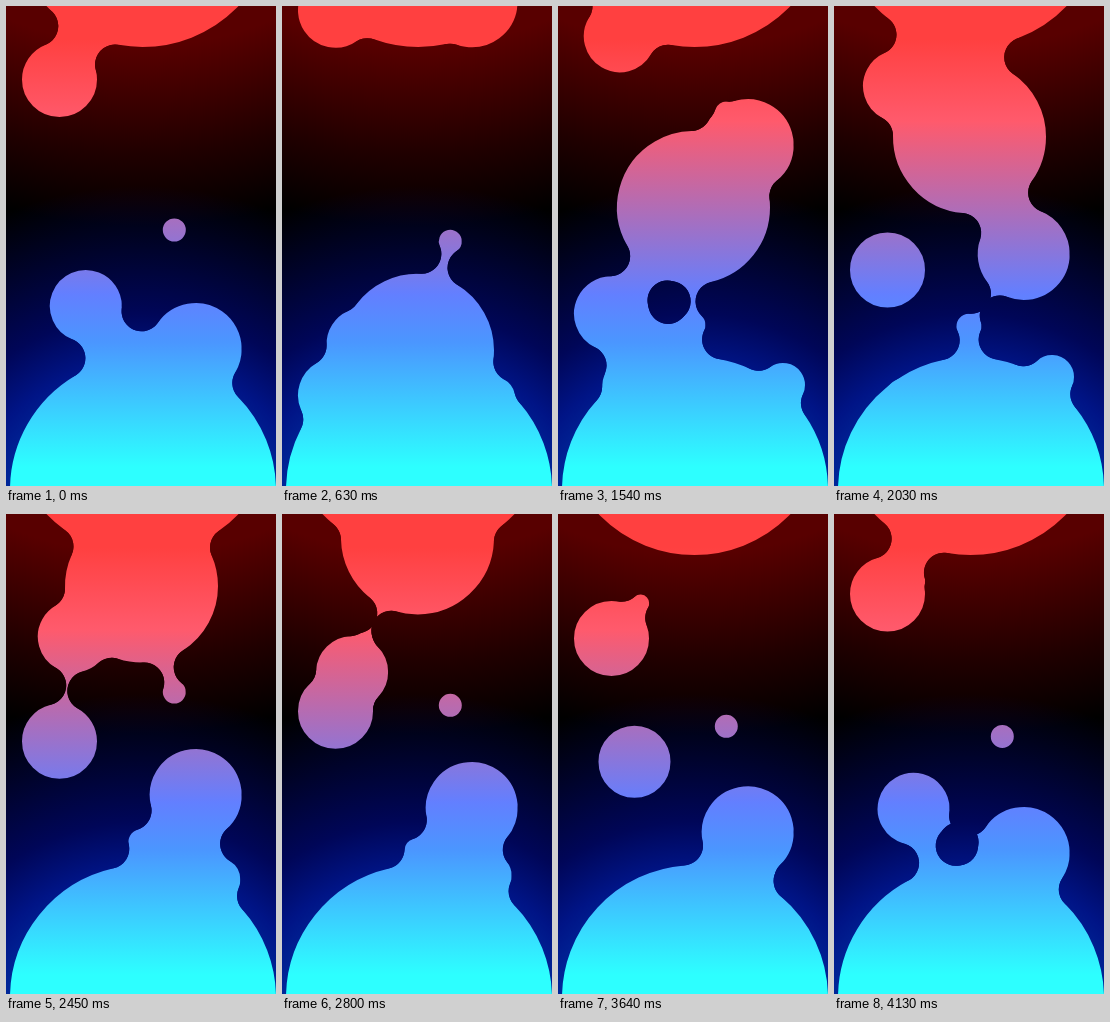
Recreate the animation shown at these times as an HTML page with a canvas. Size 270 by 480 pixels, loop 4200 ms.

```html
<!DOCTYPE html>
<html lang="en">
<head>
<meta charset="utf-8">
<title>Lava lamp</title>
<style>
html, body { margin: 0; width: 100%; height: 100%; overflow: hidden; background: #000; }
canvas { display: block; width: 100vw; height: 100vh; }
</style>
</head>
<body>
<canvas id="lamp" width="270" height="480"></canvas>
<script>
const W = 270, H = 480, LOOP = 4200, STEP = 70;
const GOO = 20; // radius of the fillets where blobs merge
const TAU = Math.PI * 2;

const ctx = document.getElementById('lamp').getContext('2d');
const layer = document.createElement('canvas');
layer.width = W;
layer.height = H;
const goo = layer.getContext('2d');

// r: radius, path: [time, x, y]; a path may run past the loop's end
const column = (r, x, ...keys) => ({ r, path: keys.map(([t, y]) => [t, x, y]) });
const drift = (r, ...path) => ({ r, path });

const pools = [{ x: 136.5, y: -92, r: 133 }, { x: 137, y: 484, r: 133 }];
const blobs = [
  column(76.5, 135.5, [0, 446], [1540, 201.5], [3700, -100]),
  column(37.5, 53.5, [0, 446], [2030, 264], [LOOP, 73.5], [5000, -15]),
  column(46, 189.7, [0, -100], [1540, 139], [2030, 248], [2450, 281], [LOOP, 343], [4830, 420]),
  column(11.5, 168.3, [630, -10], [1540, 107], [2450, 178], [LOOP, 224], [5250, 242]),
  column(12.5, 135, [0, 368], [1750, 318], [LOOP, 380]),
  column(8.7, 82.5, [1700, 176.6], [LOOP, 64]),
  drift(36, [630, 55.8, -62], [3080, 72, 186.5], [LOOP, 79.8, 300], [6230, 80, 405]),
  drift(22, [0, 200, 402], [1540, 225, 379], [2030, 218, 371], [LOOP, 189, 345])
];

function slope(p, i, k) {
  const a = p[Math.max(i - 1, 0)], b = p[Math.min(i + 1, p.length - 1)];
  return (b[k] - a[k]) / (b[0] - a[0]);
}

// cubic Hermite through the points of a path
function at(path, t) {
  if (t < path[0][0] || t > path[path.length - 1][0]) return null;
  let i = 0;
  while (i < path.length - 2 && t >= path[i + 1][0]) i++;
  const a = path[i], b = path[i + 1], d = b[0] - a[0], u = (t - a[0]) / d, v = 1 - u;
  const mix = k => a[k] * v * v * (1 + 2 * u) + b[k] * u * u * (3 - 2 * u) +
    d * u * v * (slope(path, i, k) * v - slope(path, i + 1, k) * u);
  return { x: mix(1), y: mix(2) };
}

function circlesAt(t) {
  const list = pools.map(p => ({ x: p.x, y: p.y, r: p.r + GOO }));
  for (const b of blobs) {
    for (const s of [t, t + LOOP]) {
      // a path ending with the loop has no second pass
      const p = s === LOOP && b.path[b.path.length - 1][0] === LOOP ? null : at(b.path, s);
      if (p) list.push({ x: p.x, y: p.y, r: b.r + GOO });
    }
  }
  return list;
}

// angle ranges of a circle that no other circle covers
function openArcs(c, all) {
  const cuts = [];
  for (const o of all) {
    if (o === c) continue;
    const dx = o.x - c.x, dy = o.y - c.y, d = Math.hypot(dx, dy);
    if (d >= c.r + o.r || d <= c.r - o.r) continue;
    if (d <= o.r - c.r) return [];
    const half = Math.acos((c.r * c.r + d * d - o.r * o.r) / (2 * c.r * d));
    const from = (Math.atan2(dy, dx) - half + 2 * TAU) % TAU;
    const to = from + 2 * half;
    cuts.push([from, Math.min(to, TAU)]);
    if (to > TAU) cuts.push([0, to - TAU]);
  }
  cuts.sort((p, q) => p[0] - q[0]);
  const arcs = [];
  let end = 0;
  for (const [from, to] of cuts) {
    if (from > end) arcs.push([end, from]);
    end = Math.max(end, to);
  }
  if (end < TAU) arcs.push([end, TAU]);
  return arcs;
}

function gradient(g, stops) {
  stops.forEach(([p, color]) => g.addColorStop(p, color));
  return g;
}

const fill = gradient(goo.createLinearGradient(0, 0, 0, H), [
  [0.07, '#ff4040'], [0.24, '#ff5a6c'], [0.6, '#637fff'], [0.7, '#4b96ff'], [0.96, '#2dffff']
]);
const red = gradient(ctx.createRadialGradient(135, -300, 340, 135, -300, 520), [
  [0, '#580000'], [0.6, '#200000'], [1, '#000']
]);
const blue = gradient(ctx.createRadialGradient(135, 540, 140, 135, 540, 360), [
  [0, '#002a9c'], [0.2, '#001486'], [0.42, '#000658'], [1, '#000']
]);

function drawGoo(t) {
  const all = circlesAt(t);
  goo.globalCompositeOperation = 'source-over';
  goo.clearRect(0, 0, W, H);
  goo.fillStyle = '#fff';
  for (const c of all) {
    goo.beginPath();
    goo.arc(c.x, c.y, c.r, 0, TAU);
    goo.fill();
  }
  // shrink the swollen union back, which leaves rounded joints
  goo.globalCompositeOperation = 'destination-out';
  goo.lineWidth = 2 * GOO;
  goo.lineCap = 'round';
  for (const c of all) {
    for (const [from, to] of openArcs(c, all)) {
      goo.beginPath();
      goo.arc(c.x, c.y, c.r, from, to);
      goo.stroke();
    }
  }
  goo.globalCompositeOperation = 'source-in';
  goo.fillStyle = fill;
  goo.fillRect(0, 0, W, H);
}

function draw(t) {
  ctx.globalCompositeOperation = 'source-over';
  ctx.fillStyle = '#000';
  ctx.fillRect(0, 0, W, H);
  ctx.globalCompositeOperation = 'lighter';
  for (const glow of [red, blue]) {
    ctx.fillStyle = glow;
    ctx.fillRect(0, 0, W, H);
  }
  drawGoo(t);
  ctx.globalCompositeOperation = 'source-over';
  ctx.drawImage(layer, 0, 0);
}

const start = performance.now();
function tick() {
  const t = (performance.now() - start) % LOOP;
  draw(Math.floor(t / STEP) * STEP);
  requestAnimationFrame(tick);
}
tick();
</script>
</body>
</html>
```
